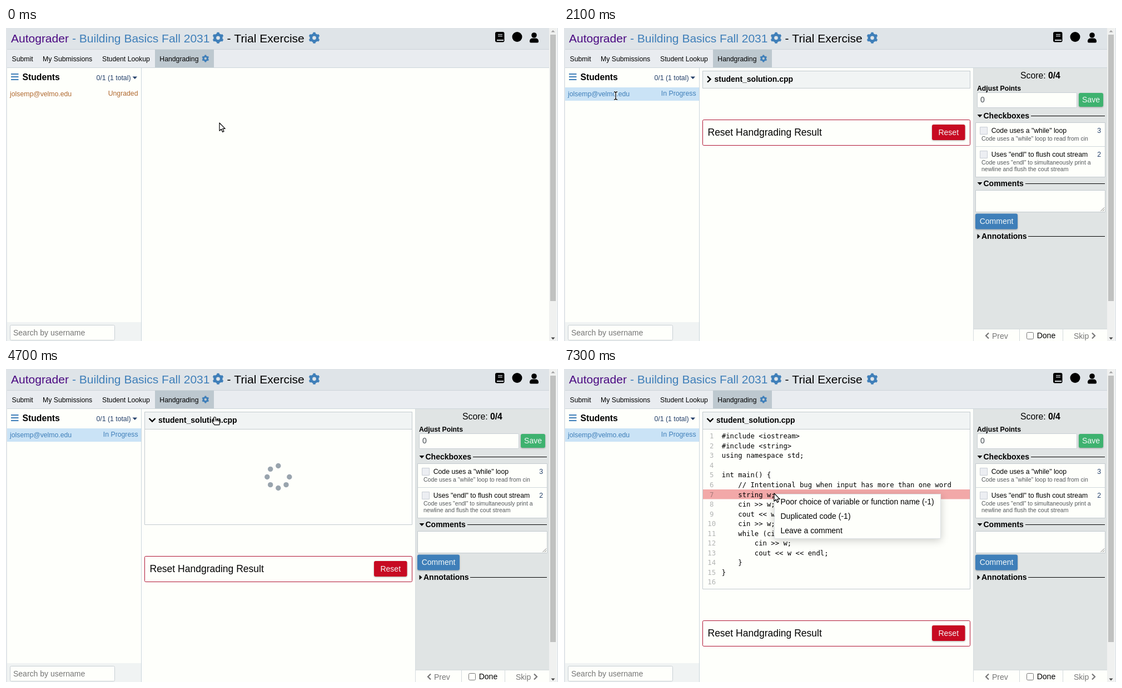
An HTML page with a canvas for the animation above (8 s loop, 993x564 px).

```html
<!DOCTYPE html>
<html lang="en">
<head>
<meta charset="utf-8">
<title>Handgrading</title>
<style>
html, body { margin: 0; width: 100%; height: 100%; overflow: hidden; background: #fefffb; }
canvas { display: block; width: 993px; height: 564px; }
</style>
</head>
<body>
<canvas id="stage" width="993" height="564"></canvas>
<script>
const ctx = document.getElementById('stage').getContext('2d');
const LOOP = 8000;
const SANS = '"Liberation Sans", Arial, sans-serif';
const MONO = '"DejaVu Sans Mono", monospace';
const PAPER = '#fefffb', BLUE = '#3f7fb9', NAVY = '#24406a', EDGE = '#c3cacf', BROWN = '#b0692f';
const S = 12.25, M = 14, L = 15.75;

const CODE = `#include <iostream>
#include <string>
using namespace std;

int main() {
    // Intentional bug when input has more than one word
    string w;
    cin >> w;
    cout << w << endl;
    cin >> w;
    while (cin) {
        cin >> w;
        cout << w << endl;
    }
}
`.split('\n');

function text(str, x, y, size, color = '#000', { bold, align = 'left', font = SANS } = {}) {
  ctx.font = `${bold ? 'bold ' : ''}${size}px ${font}`;
  ctx.textAlign = align;
  ctx.fillStyle = color;
  ctx.fillText(str, x, y);
}

function rect(x, y, w, h, color) {
  ctx.fillStyle = color;
  ctx.fillRect(x, y, w, h);
}

// Bordered box whose one pixel line lies on whole pixels
function box(x, y, w, h, fill, line, r = 0) {
  ctx.beginPath();
  ctx.roundRect(x + .5, y + .5, w - 1, h - 1, r);
  ctx.fillStyle = fill;
  ctx.fill();
  ctx.strokeStyle = line;
  ctx.lineWidth = 1;
  ctx.stroke();
}

function shadow(blur, dy, color, draw) {
  ctx.save();
  ctx.shadowBlur = blur;
  ctx.shadowOffsetY = dy;
  ctx.shadowColor = color;
  draw();
  ctx.restore();
}

function button(label, x, y, w, h, color) {
  shadow(3, 1, 'rgba(0,0,0,.3)', () => {
    ctx.beginPath();
    ctx.roundRect(x, y, w, h, 3);
    ctx.fillStyle = color;
    ctx.fill();
  });
  text(label, x + w / 2, y + h / 2 + 4.8, M, '#f4f8f8', { align: 'center' });
}

function poly(points, color) {
  ctx.beginPath();
  points.forEach(([x, y]) => ctx.lineTo(x, y));
  ctx.closePath();
  ctx.fillStyle = color;
  ctx.fill();
}

function chevron(points, color, width = 2.2) {
  ctx.beginPath();
  points.forEach(([x, y]) => ctx.lineTo(x, y));
  ctx.strokeStyle = color;
  ctx.lineWidth = width;
  ctx.stroke();
}

function dot(x, y, r, color) {
  ctx.beginPath();
  ctx.arc(x, y, r, 0, Math.PI * 2);
  ctx.fillStyle = color;
  ctx.fill();
}

function gear(x, y, size) {
  const u = size / 512;
  ctx.save();
  ctx.translate(x, y);
  ctx.beginPath();
  for (let i = 0; i < 6; i++) {
    for (const [px, py] of [[-58, -192], [-50, -245], [50, -245], [58, -192]]) ctx.lineTo(px * u, py * u);
    ctx.rotate(Math.PI / 3);
  }
  ctx.closePath();
  ctx.moveTo(82 * u, 0);
  ctx.arc(0, 0, 82 * u, 0, Math.PI * 2);
  ctx.fillStyle = BLUE;
  ctx.fill('evenodd');
  ctx.restore();
}

function drawTop() {
  rect(0, 0, 977, 39, '#dfe4e8');
  rect(0, 38, 977, 1, '#cdd4d9');
  rect(0, 39, 977, 32, '#e9ecf0');
  rect(268, 39, 106, 32, '#bdc8cf');
  rect(0, 71, 977, 1, '#cdd6db');
  text('Autograder', 9, 25.5, 21, '#4b0a82');
  text('- Building Basics Fall 2031', 119, 25.5, 21, BLUE);
  gear(381.5, 17.8, 21);
  text('- Trial Exercise', 397.5, 25.5, 21);
  gear(554.5, 17.8, 21);

  ctx.beginPath();
  ctx.roundRect(880, 7, 16.5, 18.5, 3);
  ctx.fillStyle = '#000';
  ctx.fill();
  rect(885, 11, 8, 1.2, '#dfe4e8');
  rect(885, 14, 8, 1.2, '#dfe4e8');
  rect(883, 21, 12, 2, '#dfe4e8');
  dot(919.5, 16, 9, '#000');
  dot(950, 13, 4.8, '#000');
  ctx.beginPath();
  ctx.roundRect(942, 18.5, 16, 8, [5, 5, 2, 2]);
  ctx.fill();

  text('Submit', 10.5, 59.7, S);
  text('My Submissions', 66, 59.7, S);
  text('Student Lookup', 173, 59.7, S);
  text('Handgrading', 276.3, 59.7, S);
  gear(358.8, 55, 13.5);
}

function drawScrollbar() {
  rect(977, 0, 13, 564, '#f0f1f0');
  rect(979, 12, 10, 480, '#c0c1c0');
  poly([[980.5, 7.5], [984, 4], [987.5, 7.5]], '#a0a0a0');
  poly([[980.5, 557.5], [987.5, 557.5], [984, 561.5]], '#484848');
  rect(990, 0, 3, 564, '#f1f3f4');
  rect(992, 0, 1, 564, '#d9dee2');
}

function drawStudents(hover, picked) {
  ctx.lineCap = 'butt';
  for (const y of [82, 87, 92]) rect(9, y, 13.5, 2, BLUE);
  text('Students', 29.5, 94, L, '#000', { bold: true });
  text('0/1 (1 total)', 162.5, 94, S, NAVY);
  poly([[227.5, 87.5], [236, 87.5], [231.8, 92]], NAVY);
  if (picked || hover) rect(2, 107, 241, 24, picked ? '#cae3f6' : '#e6f0f7');
  const ink = picked ? BLUE : BROWN;
  text('jolsemp@velmo.edu', 7, 123.3, S, ink);
  text(picked ? 'In Progress' : 'Ungraded', 237.5, 122, S, ink, { align: 'right' });
  rect(2, 530, 241, 34, '#f0f3f3');
  box(7, 535, 189, 28, PAPER, '#c8cfd4', 2);
  text('Search by username', 13, 553.5, M, '#757575');
  rect(243, 72, 1, 492, '#cbd6dd');
  rect(0, 0, 2, 564, '#e1e5e9');
}

function heading(label, y, lineX, open) {
  if (open) poly([[743.5, y - 2], [752.5, y - 2], [748, y + 3]], '#000');
  else poly([[743.5, y - 4], [748.5, y + .5], [743.5, y + 5]], '#000');
  text(label, open ? 754.5 : 751, y + 5, M, '#000', { bold: true });
  rect(lineX, y, 973 - lineX, 1, '#000');
}

function rubric(y, label, points, notes) {
  box(748, y, 14, 14, '#eceef2', '#c8cdd6');
  text(label, 768.7, y + 11.2, S);
  text(points, 966, y + 11.2, S, NAVY, { align: 'right' });
  notes.forEach((n, i) => text(n, 751, y + 25 + i * 12.2, 10.5, '#54585c'));
}

function drawPanel() {
  rect(737, 72, 240, 492, '#e0e4e4');
  rect(736, 72, 1, 492, '#d6dcdf');
  text('Score: ', 821, 91, L);
  text('0/4', 870.9, 91, L, '#000', { bold: true });
  text('Adjust Points', 743, 113, S, '#000', { bold: true });
  box(743, 116, 180, 28, PAPER, '#c8cfd4', 2);
  text('0', 749, 134, M, '#444b52');
  button('Save', 926, 117, 44, 25, '#3eb26f');

  heading('Checkboxes', 158, 840, true);
  box(740, 170, 234, 99, PAPER, EDGE);
  rect(741, 213, 232, 1, '#cfd7db');
  rubric(178, 'Code uses a "while" loop', '3', ['Code uses a "while" loop to read from cin']);
  rubric(221, 'Uses "endl" to flush cout stream', '2',
    ['Code uses "endl" to simultaneously print a', 'newline and flush the cout stream']);

  heading('Comments', 280, 830, true);
  box(740, 292, 234, 40, PAPER, EDGE);
  chevron([[965.5, 330], [972, 323.5]], '#777', 1);
  chevron([[969, 330], [972, 327]], '#777', 1);
  button('Comment', 740, 334.5, 76, 28, BLUE);
  heading('Annotations', 375, 835, false);

  rect(737, 542, 240, 22, PAPER);
  rect(737, 542, 240, 1, '#d3d9dc');
  rect(819, 542, 1, 22, '#d3d9dc');
  rect(897, 542, 1, 22, '#d3d9dc');
  chevron([[764, 549.5], [759, 554.5], [764, 559.5]], '#777');
  text('Prev', 770, 559.5, M, '#777');
  box(832, 548, 13, 13, PAPER, '#767676', 2);
  text('Done', 850.7, 559.2, M);
  text('Skip', 917, 559.5, M, '#777');
  chevron([[950, 549.5], [955, 554.5], [950, 559.5]], '#777');
}

function drawSpinner() {
  for (let i = 0; i < 7; i++) {
    const a = i * Math.PI / 4;
    dot(489.8 + 20 * Math.cos(a), 194.5 + 20 * Math.sin(a), 4.7, '#99a4ad');
  }
}

function drawCode(marked) {
  if (marked) rect(250, 217, 480, 17.5, '#f2a8a8');
  const opts = { font: MONO };
  CODE.forEach((line, i) => {
    const y = 125.4 + i * 17.52;
    text(i + 1, 265.7, y, S, marked && i === 6 ? '#a97b7b' : '#b3b5b4', { ...opts, align: 'center' });
    text(line, 283.8, y, S, '#000', opts);
  });
}

function drawFile(mode, marked) {
  const bottom = { closed: 109, loading: 281, open: 397 }[mode];
  const closed = mode === 'closed';
  box(249, 77, 482, bottom - 77, PAPER, EDGE);
  box(249, 77, 482, 32, '#f1f4f4', EDGE);
  if (closed) chevron([[258, 87], [263.5, 92.3], [258, 97.6]], '#000', 2.4);
  else chevron([[257.5, 89], [263, 94.6], [268.5, 89]], '#000', 2.4);
  text('student_solution.cpp', closed ? 270.5 : 274, 97.3, M, '#000', { bold: true });
  if (mode === 'loading') drawSpinner();
  if (mode === 'open') drawCode(marked);

  const y = bottom + 56;
  box(249, y, 482, 47, PAPER, '#b01535', 2);
  text('Reset Handgrading Result', 258.5, y + 28.8, 17.5);
  button('Reset', 662, y + 9, 59.5, 28, '#c70a22');
}

function drawMenu() {
  shadow(14, 4, 'rgba(0,0,0,.2)', () => rect(378, 225, 300, 80, PAPER));
  box(378, 225, 300, 81, PAPER, '#dde2e5');
  ['Poor choice of variable or function name (-1)', 'Duplicated code (-1)', 'Leave a comment']
    .forEach((item, i) => text(item, 389.5, 244 + i * 26.2, M));
}

const ARROW = new Path2D('M0 0V14.2L3.4 11.2L5.6 16.4L8 15.3L5.8 10.4H10.2Z');
const HAND = new Path2D('M-1.7 1Q0 -1 1.7 1V5L7 5.8Q9.3 6.4 9.2 8.6L8.2 14.2H-.4L-4.2 9.4Q-4.8 6.6 -2.6 7.2L-1.7 8.2Z');
const KNUCKLES = new Path2D('M1.7 5V8M4.3 5.6V8M6.8 6V8.4');
const BEAM = new Path2D('M-1 -4Q2 -4 2 -2Q2 -4 5 -4M2 -3V9M-1 10Q2 10 2 8Q2 10 5 10');

function drawCursor(kind, [x, y]) {
  ctx.save();
  ctx.translate(x, y);
  ctx.lineJoin = 'round';
  ctx.strokeStyle = '#000';
  if (kind === 'beam') {
    ctx.lineWidth = 3;
    ctx.strokeStyle = '#fff';
    ctx.stroke(BEAM);
    ctx.strokeStyle = '#000';
    ctx.lineWidth = 1.3;
    ctx.stroke(BEAM);
  } else {
    const shape = kind === 'hand' ? HAND : ARROW;
    ctx.fillStyle = '#fff';
    ctx.fill(shape);
    ctx.lineWidth = 1.2;
    ctx.stroke(shape);
    ctx.lineWidth = .9;
    if (kind === 'hand') ctx.stroke(KNUCKLES);
  }
  ctx.restore();
}

// Pointer moves: first step time, number of 100 ms steps, start, bend, end
const MOVES = [
  { at: 700, steps: 7, from: [384, 171], bend: [240, 150], to: [91, 119] },
  { at: 3300, steps: 8, from: [91, 119], bend: [245, 208], to: [375.5, 86.5] },
  { at: 6000, steps: 9, from: [375.5, 86.5], bend: [412, 150], to: [377.5, 223] }
];

function pointer(t) {
  if (t >= 6900) return [378, 224];
  let pos = MOVES[0].from;
  for (const { at, steps, from, bend, to } of MOVES) {
    if (t < at) break;
    const p = Math.min(1, (Math.floor((t - at) / 100) + 1) / steps);
    const e = p * p * (3 - 2 * p), r = 1 - e;
    pos = from.map((v, i) => r * r * v + 2 * r * e * bend[i] + e * e * to[i]);
  }
  return pos;
}

function render(t) {
  const pos = pointer(t), [x, y] = pos;
  const picked = t >= 2100;
  const menu = t >= 7300;
  const onRow = x < 243 && y >= 107 && y < 131;
  const onFile = picked && x > 249 && y >= 77 && y < 109;
  const kind = onRow && picked && x < 118 ? 'beam' : onRow || onFile ? 'hand' : 'arrow';

  rect(0, 0, 993, 564, PAPER);
  drawTop();
  drawStudents(onRow, picked);
  if (picked) {
    drawFile(t < 4700 ? 'closed' : t < 4800 ? 'loading' : 'open', menu);
    drawPanel();
  }
  drawScrollbar();
  if (menu) drawMenu();
  drawCursor(kind, pos);
}

const start = performance.now();
function tick() {
  render((performance.now() - start) % LOOP);
  requestAnimationFrame(tick);
}
tick();
</script>
</body>
</html>
```
